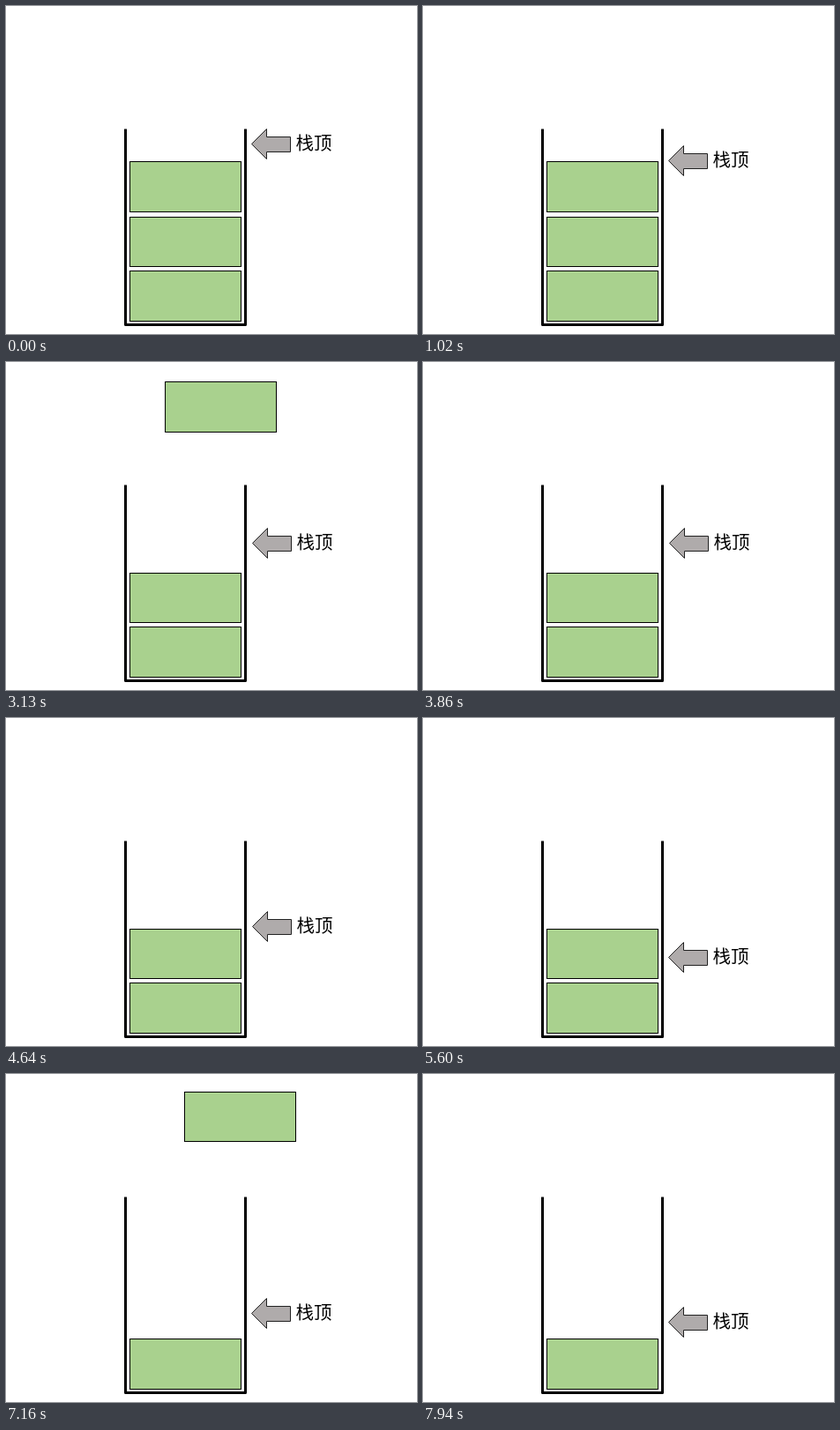
Recreate the animation shown at these times as an HTML page. Size 466 by 372 pixels, loop 8000 ms.

```html
<!DOCTYPE html>
<html lang="zh-CN">
<head>
<meta charset="utf-8">
<title>栈顶</title>
<style>
  html, body { margin: 0; width: 100%; height: 100%; overflow: hidden; background: #fff; }
  svg { display: block; }
  .block { fill: #a9d18e; stroke: #000; }
  .arrow { fill: #afabab; stroke: #222; }
  .walls { fill: none; stroke: #000; stroke-width: 3; }
  text { font: 500 20.5px "Noto Sans CJK SC", "Noto Sans CJK", sans-serif; }
</style>
</head>
<body>
<svg width="466" height="372" viewBox="0 0 466 372">
  <path class="walls" d="M135.5 139.5V361.5H271.5V139.5" stroke-linejoin="round"/>
  <rect class="block" x="140.5" y="300.5" width="126" height="57"/>
  <rect class="block" id="middle" x="140.5" y="239.5" width="126" height="56"/>
  <rect class="block" id="upper" x="140.5" y="176.5" width="126" height="57"/>
  <g id="pointer">
    <path class="arrow" d="M278.5 156.5L295.5 139.5V148.5H322.5V165.5H295.5V173.5Z"/>
    <text x="328.5" y="163.3">栈顶</text>
  </g>
</svg>
<script>
  const LOOP = 8000, TICK = 60.15, MOVE = 1520;
  const byId = id => document.getElementById(id);

  // Constant acceleration to the midpoint, then constant braking.
  const smooth = u => u < 0.5 ? 2 * u * u : 1 - 2 * (1 - u) ** 2;
  const progress = (time, start) =>
    smooth(Math.min(1, Math.max(0, (time - start) / MOVE)));

  const pointerMoves = [
    { start: 300, dx: 1, dy: 49 },
    { start: 3892, dx: -1, dy: 66 },
    { start: 7520, dx: 0, dy: 66 }
  ];

  const pops = [
    { id: "upper", start: 2010, gone: 3710, d: "M0 0V-80Q0 -154 44 -154H68" },
    { id: "middle", start: 5618, gone: 7320, d: "M0 0V-70Q0 -219 62 -219" }
  ].map(pop => {
    const path = document.createElementNS("http://www.w3.org/2000/svg", "path");
    path.setAttribute("d", pop.d);
    return { ...pop, path, length: path.getTotalLength(), block: byId(pop.id) };
  });

  function shift(element, x, y) {
    element.setAttribute("transform", `translate(${Math.round(x)} ${Math.round(y)})`);
  }

  function draw(time) {
    let x = 0, y = 0;
    for (const { start, dx, dy } of pointerMoves) {
      const p = progress(time, start);
      x += dx * p;
      y += dy * p;
    }
    shift(byId("pointer"), x, y);

    for (const { start, gone, path, length, block } of pops) {
      const point = path.getPointAtLength(length * progress(time, start));
      shift(block, point.x, point.y);
      block.setAttribute("visibility", time < gone ? "visible" : "hidden");
    }
  }

  const origin = performance.now();
  function frame() {
    const time = (performance.now() - origin) % LOOP;
    draw(Math.floor(time / TICK) * TICK);
    requestAnimationFrame(frame);
  }
  frame();
</script>
</body>
</html>
```
